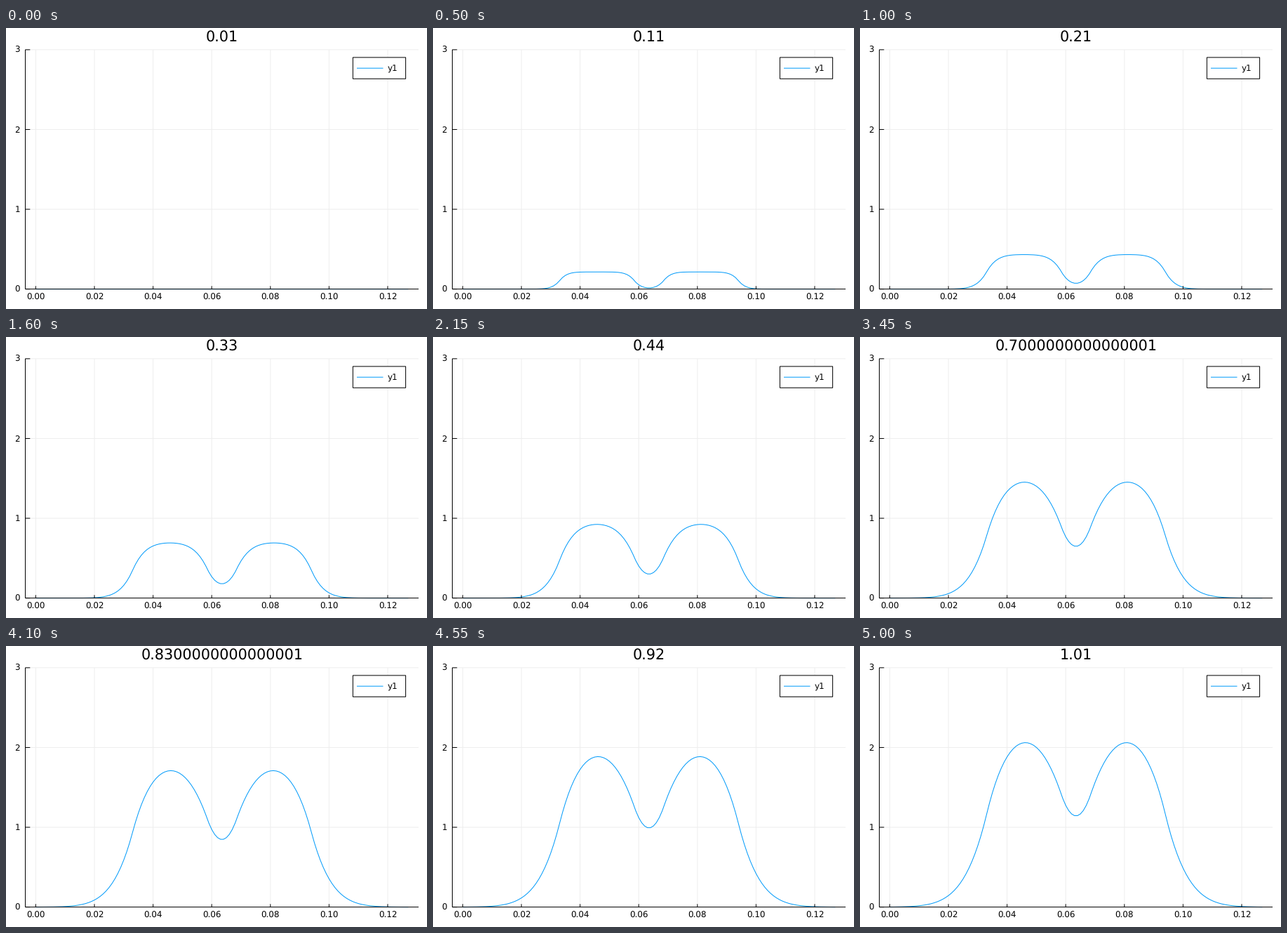
Recreate the animation shown at these times as a matplotlib script. Size 600x400 px, loop 5.05 s.

```python
import numpy as np
import matplotlib.pyplot as plt
from matplotlib.animation import FuncAnimation
from matplotlib.patches import Rectangle

W, H, DPI = 600, 400, 100
FRAMES, INTERVAL = 101, 50
DT = 0.01
BLUE = "#009AFA"
PX = 72 / DPI  # points per pixel

# Heated rod: diffusion, two uniform sources, weak growth, cold ends
LENGTH = 0.127
CELLS = 127
DIFFUSIVITY = 6.9e-5
HEATING = 2.1232
GROWTH = 0.2
HEATER = 0.0254
HALF_GAP = 0.00504

LEFT, RIGHT, TOP, BOTTOM = 27.5, 588, 30.9, 371.6
X0, X_SCALE = 42.4, 4180
Y_SCALE = (BOTTOM - TOP) / 3


def to_x(x):
    return X0 + X_SCALE * x


def to_y(u):
    return BOTTOM - Y_SCALE * u


x = np.linspace(0, LENGTH, CELLS + 1)
wave = np.arange(1, 301) * np.pi / LENGTH
rate = DIFFUSIVITY * wave**2 - GROWTH
modes = np.sin(np.outer(x, wave))


def source_coeffs():
    mid = LENGTH / 2
    inner, outer = HALF_GAP, HALF_GAP + HEATER
    total = 0
    for a, b in ((mid - outer, mid - inner), (mid + inner, mid + outer)):
        total = total + np.cos(wave * a) - np.cos(wave * b)
    return HEATING * 2 / (LENGTH * wave) * total


coeffs = source_coeffs()


def temperature(t):
    return modes @ (coeffs * (1 - np.exp(-rate * t)) / rate)


plt.rcParams["font.family"] = "DejaVu Sans"
plt.rcParams["text.hinting"] = "none"
fig = plt.figure(figsize=(W / DPI, H / DPI), dpi=DPI, facecolor="white")
ax = fig.add_axes([0, 0, 1, 1])
ax.set_xlim(0, W)
ax.set_ylim(H, 0)
ax.axis("off")


def line(xs, ys, color="black", z=3):
    return ax.plot(xs, ys, color=color, lw=PX, zorder=z, snap=False,
                   solid_capstyle="butt")[0]


def label(px, py, text, size=11.9, ha="center"):
    return ax.text(px, py, text, fontsize=size * PX, ha=ha, va="baseline",
                   color="black", zorder=6)


for i in range(7):
    px = to_x(0.02 * i)
    line([px, px], [TOP, BOTTOM], "#eeeeee", 1)
    line([px, px], [BOTTOM, BOTTOM - 4.2])
    label(px, 387.2, f"{0.02 * i:.2f}")

for i in range(4):
    py = to_y(i)
    line([LEFT, RIGHT], [py, py], "#eeeeee", 1)
    line([LEFT, LEFT + 6.8], [py, py])
    label(16, py + 4.4, str(i))

line([LEFT, RIGHT], [BOTTOM, BOTTOM])
line([LEFT, LEFT], [TOP, BOTTOM])

ax.add_patch(Rectangle((494.4, 41.9), 75.2, 30.4, fc="white", ec="black",
                       lw=PX, zorder=4, snap=False))
line([500, 537.5], [57.2, 57.2], BLUE, 5)
label(543.5, 61.6, "y1", ha="left")

title = label((LEFT + RIGHT) / 2, 19, "", 20.8)
curve = line(to_x(x), to_y(0 * x), BLUE, 2)


def draw(i):
    title.set_text(str((i + 1) * DT))
    curve.set_ydata(to_y(temperature(i * DT)))
    return title, curve


anim = FuncAnimation(fig, draw, frames=FRAMES, interval=INTERVAL,
                     repeat=True, repeat_delay=0, blit=False)
plt.show()
```
